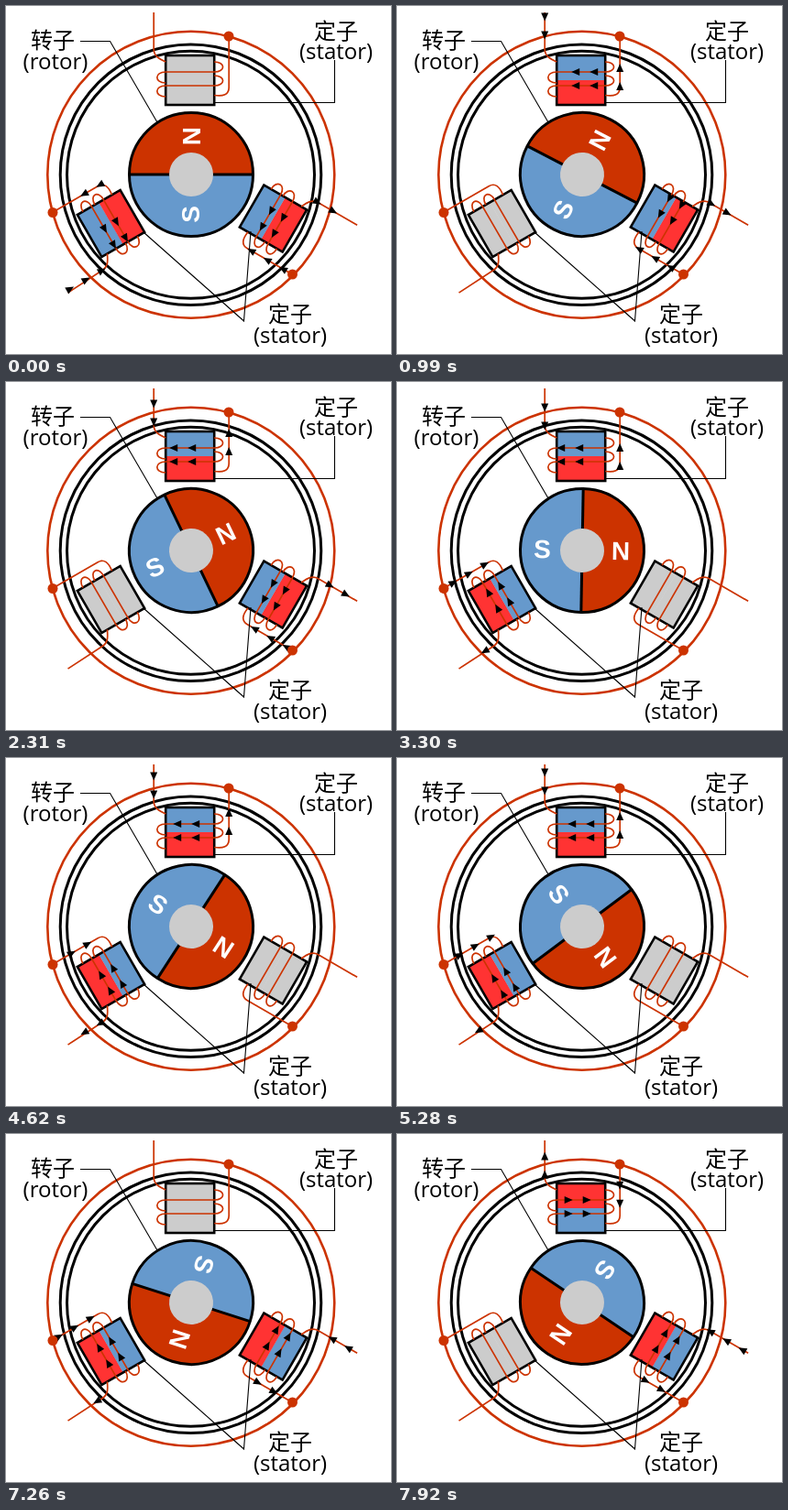
Animation of 420x380 px, one loop 8000 ms. Source, as an HTML page:

```html
<!DOCTYPE html>
<html lang="zh">
<head>
<meta charset="utf-8">
<style>
  html, body { margin: 0; width: 100%; height: 100%; overflow: hidden; background: #fff; }
  svg { display: block; width: 420px; height: 380px; }
  .ring { fill: none; stroke: #000; stroke-width: 3; }
  .wire { fill: none; stroke: #c30; stroke-width: 1.7; }
  .leader { fill: none; stroke: #000; stroke-width: 1.1; }
  .dot, .north { fill: #c30; }
  .south { fill: #69c; }
  .pole { fill: #fff; font: bold 28px "Liberation Sans", Arial, sans-serif; }
  .label { font: 24px "Open Sans", "Noto Sans CJK SC", "Noto Sans CJK", sans-serif; }
  text { text-anchor: middle; }
</style>
</head>
<body>
<svg viewBox="0 0 420 380">
  <circle class="wire" cx="201.8" cy="184.3" r="156.5" style="stroke-width:2.6"/>
  <circle class="ring" cx="201.5" cy="184.3" r="142.3"/>
  <circle class="ring" cx="201.5" cy="184.3" r="135"/>

  <g id="rotor">
    <path class="north" d="M-67.5 0A67.5 67.5 0 0 1 67.5 0Z"/>
    <path class="south" d="M-67.5 0A67.5 67.5 0 0 0 67.5 0Z"/>
    <path class="ring" d="M-67.5 0H67.5"/>
    <circle class="ring" r="67.5"/>
    <circle r="24" fill="#ccc"/>
    <g class="pole" transform="rotate(-90)">
      <text x="42" y="9.5">N</text>
      <text x="-43.5" y="9">S</text>
    </g>
  </g>

  <g id="stators"></g>

  <circle class="dot" cx="243" cy="33" r="5.5"/>
  <circle class="dot" cx="51" cy="225.5" r="5.5"/>
  <circle class="dot" cx="312.5" cy="293" r="5.5"/>

  <path class="leader" d="M81 38.5H113.5L165 127M358.5 59V105.5H227M150 247L259.5 344L267 246"/>
  <g class="label">
    <text x="51" y="46">转子</text><text x="54" y="69">(rotor)</text>
    <text x="360" y="35.5">定子</text><text x="360" y="58">(stator)</text>
    <text x="310" y="345">定子</text><text x="310" y="368">(stator)</text>
  </g>
</svg>
<script>
const LOOP = 8000, STEP = 330, SPACING = 20, SPEED = 8;
const BLUE = '#69c', RED = '#f33', GREY = '#ccc';

// lead: outer end of the feed wire; phase and limit hold values for forward / reverse current
const stators = [
  { x: 200.7, y: 81, angle: 0, lead: '-39.5 -74', phase: [7, 15], limit: [-70, -66] },
  { x: 114.5, y: 237.5, angle: -120, lead: '-42 -78.5', phase: [6, 15.5], limit: [-75, -58.5] },
  { x: 291.5, y: 232, angle: 120, lead: '-39.5 -83', phase: [12.7, 7], limit: [-78, -71] }
];

// first step of each commutation stage and the current in the top, left and right coils
const stages = [
  [0, [0, 1, -1]], [3, [1, 0, -1]], [10, [1, -1, 0]], [17, [0, -1, 1]], [23, [-1, 0, 1]]
];

// step, rotor angle
const turns = [[0, 0], [3, 27.5], [7, 64.4], [10, 91], [14, 123], [19, 173.5], [24, 214]];

const coil = lead => `M${lead}L-39.5 -34C-39.5 -26 -33 -23 -26.5 -20
  M26.5 -20C39 -20 39 -9 26.5 -9H-26.5C-39 -9 -39 3 -26.5 3
  M26.5 -5C39 -5 39 6 26.5 6H-26.5C-39 6 -39 18 -26.5 18
  M26.5 16.5C36 18 42.5 16 42.5 8V-48`;

const rotor = document.getElementById('rotor');
const parent = document.getElementById('stators');
parent.innerHTML = stators.map(s => `
  <g transform="translate(${s.x} ${s.y}) rotate(${s.angle})">
    <rect class="outer" x="-26.5" y="-27" width="53" height="27.3"/>
    <rect class="inner" x="-26.5" y="0" width="53" height="27"/>
    <rect class="ring" x="-26.5" y="-27" width="53" height="54" style="stroke-width:2.6"/>
    <path class="wire" d="${coil(s.lead)}"/>
    <path class="arrows"/>
  </g>`).join('');
stators.forEach((s, i) => {
  const group = parent.children[i];
  for (const name of ['outer', 'inner', 'arrows']) s[name] = group.querySelector('.' + name);
});

const mod = (a, n) => ((a % n) + n) % n;

function arrowHead(x, y, dir, vertical) {
  const back = -9 * dir;
  return vertical
    ? `M${x} ${y + 4.5 * dir}l-4 ${back}h8z`
    : `M${x + 4.5 * dir} ${y}l${back} -4v8z`;
}

// evenly spaced arrows moving along a straight wire between lo and hi
function arrowRow(fixed, phase, lo, hi, dir, step, vertical) {
  let d = '';
  for (let p = lo + mod(phase + dir * SPEED * step - lo, SPACING); p <= hi; p += SPACING)
    d += vertical ? arrowHead(fixed, p, dir, true) : arrowHead(p, fixed, dir, false);
  return d;
}

function drawStator(s, current, step) {
  const k = current < 0 ? 1 : 0;
  s.outer.style.fill = [RED, GREY, BLUE][current + 1];
  s.inner.style.fill = [BLUE, GREY, RED][current + 1];
  s.arrows.setAttribute('d', !current ? '' :
    arrowRow(-39.5, s.phase[k], s.limit[k], -33, current, step, true) +
    arrowRow(-9, [18, 14.5][k], -23, 16, -current, step, false) +
    arrowRow(6, [18, 14.5][k], -23, 16, -current, step, false) +
    arrowRow(42.5, [10.5, 3.3][k], [-27, -41.5][k], 12, -current, step, true));
}

function rotorAngle(step) {
  const i = Math.max(1, turns.findIndex(([s]) => s >= step));
  const [s0, a0] = turns[i - 1], [s1, a1] = turns[i];
  return a0 + (a1 - a0) * (step - s0) / (s1 - s0);
}

function draw() {
  const step = Math.floor(performance.now() % LOOP / STEP);
  const currents = stages.filter(([first]) => first <= step).pop()[1];
  rotor.setAttribute('transform', `translate(202 184) rotate(${rotorAngle(step)})`);
  stators.forEach((s, i) => drawStator(s, currents[i], step));
  requestAnimationFrame(draw);
}
draw();
</script>
</body>
</html>
```
